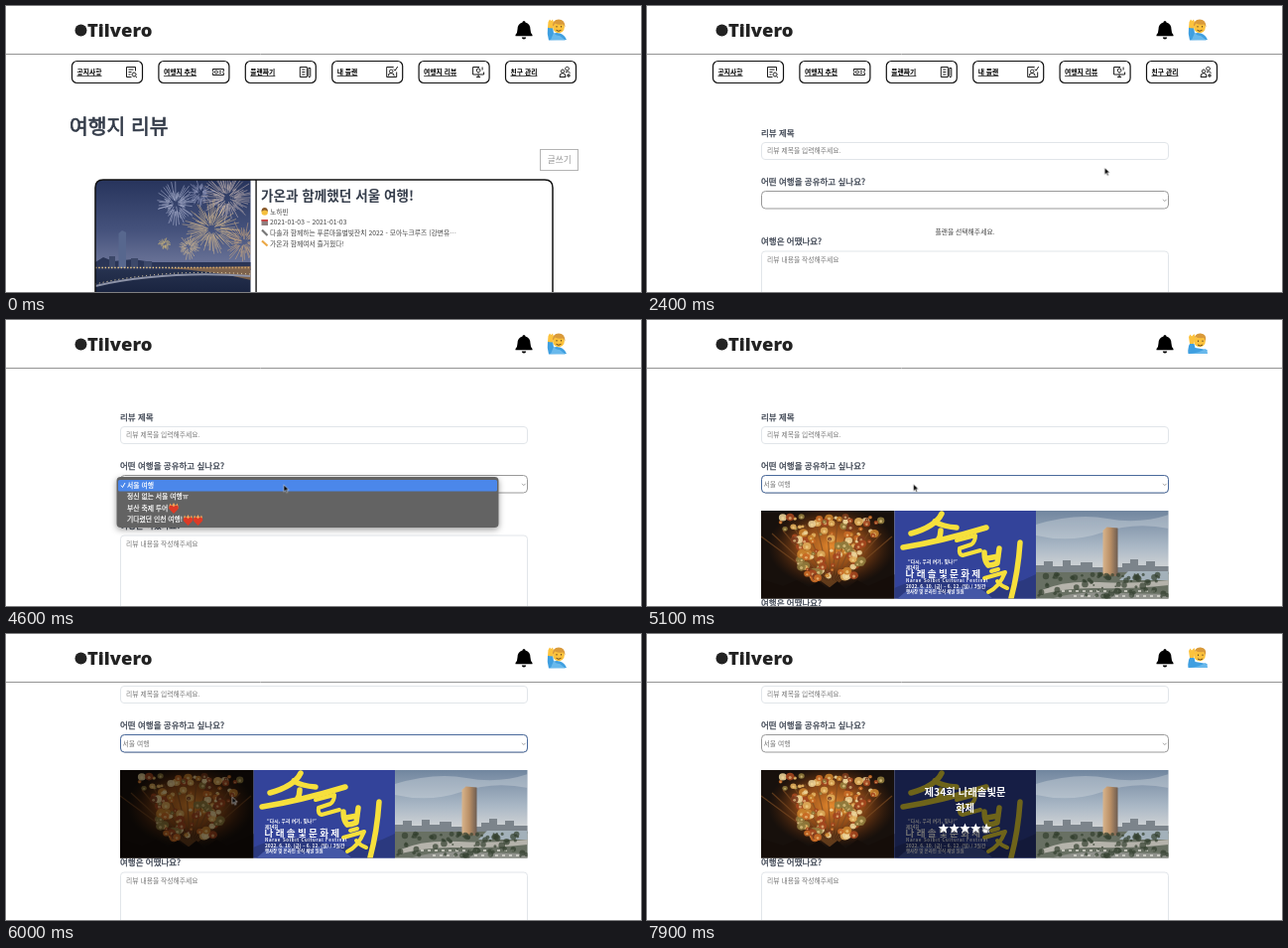
Animation, 640 px wide and 288 px high, one loop 8 s. Source, as an HTML page:

```html
<!DOCTYPE html>
<html lang="ko">
<head>
<meta charset="utf-8">
<title>여행지 리뷰</title>
<style>
html, body { margin: 0; width: 100%; height: 100%; overflow: hidden; background: #fff; }
svg { display: block; }
text { font-family: "Noto Sans CJK KR", "Noto Sans CJK", sans-serif; fill: #343c4a; white-space: pre; }
.brand { font: 800 18.4px "Open Sans", sans-serif; fill: #222; }
.nav text { font-size: 6.8px; font-weight: 700; text-decoration: underline; fill: #000; }
.nav g { fill: none; stroke: #000; stroke-width: .9; }
/* A hairline stroke stands in for a medium weight. */
.h1 { font-size: 20.4px; stroke: #343c4a; stroke-width: .7; }
.label { font-size: 8.5px; stroke: #343c4a; stroke-width: .25; }
.small { font-size: 6.8px; fill: #444; }
.hold { font-size: 6.8px; fill: #777; }
.btn { font-size: 8.7px; fill: #999; }
.field { fill: #fff; stroke: #e1e5e9; }
.menu text { font-size: 6.8px; fill: #fff; stroke: #fff; stroke-width: .2; }
.info text { font-size: 10.4px; font-weight: 700; fill: #fff; text-anchor: middle; }
.poster text { fill: #fff; font-size: 4.8px; font-weight: 700; }
.brush { fill: none; stroke: #f6e03c; stroke-linecap: round; stroke-linejoin: round; }

/* One loop is 8 s, so 1.25% is 100 ms. */
.step, .move { animation: 8s infinite; }
.step { animation-timing-function: step-end; }
.move { animation-timing-function: linear; }

.scroll { animation-name: scroll; }
@keyframes scroll {
  0%, 35% { transform: translateY(30px); }
  37.5% { transform: translateY(11px); }
  40%, 68.75% { transform: none; }
  70% { transform: translateY(-17px); }
  72.5% { transform: translateY(-46px); }
  73.75%, 100% { transform: translateY(-55px); }
}
.list { animation-name: list; }
@keyframes list { 0% { visibility: visible; } 20%, 100% { visibility: hidden; } }
.form { animation-name: form; }
@keyframes form { 0% { opacity: 0; } 20%, 100% { opacity: 1; } }
.over { animation-name: over; }
@keyframes over { 0% { opacity: 0; } 11.25%, 100% { opacity: 1; } }
.menu { animation-name: menu; }
@keyframes menu { 0% { opacity: 0; } 48.75% { opacity: 1; } 60%, 100% { opacity: 0; } }
.before { animation-name: before; }
@keyframes before { 0% { opacity: 1; } 60%, 100% { opacity: 0; } }
.after { animation-name: after; }
@keyframes after { 0% { opacity: 0; } 60%, 100% { opacity: 1; } }
.below { animation-name: below; }
@keyframes below { 0% { transform: none; } 60%, 100% { transform: translateY(78px); } }
.focus { animation-name: focus; }
@keyframes focus { 0% { opacity: 0; } 60% { opacity: 1; } 90%, 100% { opacity: 0; } }
.dim1 { animation-name: dim1; }
@keyframes dim1 { 0%, 72.5% { opacity: 0; } 75%, 91.25% { opacity: .52; } 93.75%, 100% { opacity: 0; } }
.info1 { animation-name: info1; }
@keyframes info1 { 0%, 75% { opacity: 0; } 78.75%, 91.25% { opacity: 1; } 93.75%, 100% { opacity: 0; } }
.dim2 { animation-name: dim2; }
@keyframes dim2 { 0%, 92.5% { opacity: 0; } 96.25%, 100% { opacity: .55; } }
.info2 { animation-name: info2; }
@keyframes info2 { 0%, 92.5% { opacity: 0; } 96.25%, 100% { opacity: 1; } }
.cursor { animation-name: cursor; }
@keyframes cursor {
  0%, 2.5% { transform: translate(587px, 300px); }
  7.5% { transform: translate(574px, 196px); }
  11.25%, 23.75% { transform: translate(564px, 154px); }
  33.75% { transform: translate(400px, 168px); }
  42.5% { transform: translate(356px, 157px); }
  48.75% { transform: translate(332px, 162px); }
  56.25%, 60% { transform: translate(280px, 166px); }
  70% { transform: translate(249.5px, 164px); }
  75% { transform: translate(228px, 164px); }
  83.75% { transform: translate(226px, 186px); }
  91.25% { transform: translate(246px, 204px); }
  95% { transform: translate(312px, 206px); }
  98.75%, 100% { transform: translate(338px, 193px); }
}
.arrow { animation-name: arrow; }
@keyframes arrow { 0% { opacity: 1; } 11.25% { opacity: 0; } 20% { opacity: 1; } 77.5%, 100% { opacity: 0; } }
.hand { animation-name: hand; }
@keyframes hand { 0% { opacity: 0; } 11.25% { opacity: 1; } 20% { opacity: 0; } 77.5%, 100% { opacity: 1; } }
.rest { animation-name: rest; }
@keyframes rest {
  0%, 11.25%, 30%, 48.75%, 67.5%, 86.25% { opacity: 1; }
  2.5%, 21.25%, 40%, 58.75%, 77.5%, 96.25%, 100% { opacity: 0; }
}
.wave { animation-name: wave; }
@keyframes wave {
  0%, 11.25%, 30%, 48.75%, 67.5%, 86.25% { opacity: 0; }
  2.5%, 21.25%, 40%, 58.75%, 77.5%, 96.25%, 100% { opacity: 1; }
}
</style>
</head>
<body>
<svg width="640" height="288">
  <defs>
    <linearGradient id="night" x2="0" y2="1">
      <stop stop-color="#27345c"/><stop offset=".45" stop-color="#45527c"/>
      <stop offset=".76" stop-color="#6b7498"/><stop offset=".8" stop-color="#26324f"/><stop offset="1" stop-color="#1a2440"/>
    </linearGradient>
    <linearGradient id="sky" x2="0" y2="1">
      <stop stop-color="#71869f"/><stop offset=".4" stop-color="#a9b7c5"/><stop offset=".65" stop-color="#d0d3d5"/>
    </linearGradient>
    <linearGradient id="gold"><stop stop-color="#d8b48c"/><stop offset=".5" stop-color="#b98f66"/><stop offset="1" stop-color="#6d5c50"/></linearGradient>
    <radialGradient id="glow"><stop stop-color="#e58a2e"/><stop offset=".5" stop-color="#a8561a" stop-opacity=".8"/><stop offset="1" stop-color="#5a2a0c" stop-opacity="0"/></radialGradient>
    <filter id="shade" x="-5%" y="-20%" width="110%" height="150%"><feDropShadow dx="0" dy="2" stdDeviation="3" flood-opacity=".4"/></filter>
    <clipPath id="cover"><path d="M90 288V183q0-8 8-8H246.500V288z"/></clipPath>
    <clipPath id="shot1"><path d="M115 192h134.500v88.500H115z"/></clipPath>
    <clipPath id="shot2"><path d="M249.500 192H392v88.500H249.500z"/></clipPath>
    <clipPath id="shot3"><path d="M392 192h133.500v88.500H392z"/></clipPath>
    <g id="burning">
      <path d="M-4.500 0Q-5-3-3.500-5.500Q-2.500-4-2-3Q-1-4 0-6Q1-4 2-3Q2.500-4 3.500-5.500Q5-3 4.500 0z" fill="#f3a55a"/>
      <path d="M0 5L-4 1C-6.500-2-2.500-5 0-1.800C2.500-5 6.500-2 4 1z" fill="#dc3a26"/>
    </g>
  </defs>

  <g class="move scroll">
    <g transform="translate(0 -30)">
      <g class="nav" id="nav"></g>
      <g class="step list">
        <text class="h1" x="64" y="128.500">여행지 리뷰</text>
        <rect x="538.500" y="144.500" width="38" height="21" fill="#fff" stroke="#b4b4b4"/>
        <text class="btn" x="545.700" y="158">글쓰기</text>
        <g class="step over">
          <rect x="538.500" y="144.500" width="38" height="21" fill="#6c757d" stroke="#6c757d"/>
          <text class="btn" x="545.700" y="158" style="fill:#fff">글쓰기</text>
        </g>
        <g clip-path="url(#cover)">
          <rect x="90" y="175" width="157" height="113" fill="url(#night)"/>
          <path d="M90 258l8-5 10 4 20-2 20 3h99v8H90z" fill="#2a3556"/>
          <path d="M113.500 264V229l3.500-3 4 2v36z" fill="#57678e"/>
          <path d="M104 264v-12h6v12zM126 264v-10h7v10zM139 264v-7h8v7z" fill="#3c4869"/>
          <g id="fire" fill="none" stroke-width=".6"></g>
          <path d="M90 263.500H247" stroke="#e9c88a" stroke-width="1.600" stroke-dasharray="1.500 1.700"/>
          <path d="M160 264q45 2 87 12v-14z" fill="#c58a4a" opacity=".55"/>
          <path d="M90 282q70-16 157-10" fill="none" stroke="#8d93a8" stroke-width="2"/>
          <path d="M90 280q70-16 157-10" fill="none" stroke="#f3deb0" stroke-dasharray="1 3"/>
        </g>
        <path d="M90 288V183q0-8 8-8H543q8 0 8 8V290M252 175V290" fill="none" stroke="#111" stroke-width="1.500"/>
        <path d="M247 176h4.200v112H247z" fill="#fff"/>
        <text x="257" y="195.600" font-size="13.600" font-weight="700">가온과 함께했던 서울 여행!</text>
        <circle cx="260.700" cy="207.500" r="3.200" fill="#f5c03f"/><path d="M257.500 207q0-4 3.200-4t3.200 4q-3-3-6.400 0z" fill="#8a5a2b"/>
        <text class="small" x="266" y="209.700">노하빈</text>
        <path d="M257.500 215h6.500v6h-6.500z" fill="#8f8080"/><path d="M257.500 215h6.500v1.800h-6.500z" fill="#c44"/>
        <text class="small" x="266" y="220.400">2021-01-03 ~ 2021-01-03</text>
        <path d="M258 225.500l5.500 5.500" stroke="#777" stroke-width="2.200"/>
        <text class="small" x="266" y="230.900">다솔과 함께하는 푸른마을별빛잔치 2022 - 모아누크루즈 (강변유…</text>
        <path d="M258 236.500l5.500 5" stroke="#eba845" stroke-width="2.200"/>
        <text class="small" x="266" y="241.500">가온과 함께여서 즐거웠다!</text>
      </g>
    </g>

    <g class="step form">
      <text class="label" x="115" y="101.200">리뷰 제목</text>
      <rect class="field" x="115.500" y="107.500" width="410" height="17" rx="3.500"/>
      <text class="hold" x="121" y="118.400">리뷰 제목을 입력해주세요.</text>
      <text class="label" x="115" y="150.200">어떤 여행을 공유하고 싶나요?</text>
      <rect class="field" x="115.500" y="156.500" width="410" height="17.500" rx="4" style="stroke:#999"/>
      <rect class="field step focus" x="115.500" y="156.500" width="410" height="17.500" rx="4" style="stroke:#4a6a9c"/>
      <path d="M520 164.800l1.800 1.800 1.800-1.800" fill="none" stroke="#888" stroke-width=".8"/>
      <text class="hold step after" x="117.500" y="167.800">서울 여행</text>
      <text class="small step before" x="320.500" y="199.500" text-anchor="middle">플랜을 선택해주세요.</text>

      <g class="step below">
        <text class="label" x="115" y="210.400">여행은 어땠나요?</text>
        <rect class="field" x="115.500" y="217" width="410" height="150" rx="3.500"/>
        <text class="hold" x="121" y="227.600">리뷰 내용을 작성해주세요</text>
      </g>

      <g class="step after">
        <g clip-path="url(#shot1)">
          <rect x="115" y="192" width="135" height="89" fill="#17100c"/>
          <ellipse cx="186" cy="228" rx="64" ry="42" fill="url(#glow)"/>
          <path id="beams" stroke="#7a4a22" stroke-width="1.200" opacity=".7"/>
          <g id="lamps"></g>
          <path d="M115 281v-20l22 7 14-6 12 7 10-6 9 8 10-8 8 8 12-9 11 6 27-12v25z" fill="#150d09"/>
        </g>
        <g class="poster" clip-path="url(#shot2)">
          <rect x="249" y="192" width="143" height="89" fill="#33439a"/>
          <path d="M249 270q35-16 70-5t73-9v25H249z" fill="#2b397f"/>
          <path d="M252 281q22-22 47-5q30-17 50 5z" fill="#4457a6"/>
          <path class="brush" stroke-width="5.500" d="M297 195q-6 13-31 20M290 203q8 5 22 6M258 229q38-6 84-20M296 212q0 6-3 10M376 224q-2 30-9 56M340 234q0 9 4 13M355 230l-2 15q-5 2-9 2M343 240l11-2"/>
          <path class="brush" stroke-width="4" d="M312 222l19-5q0 6-4 9l-12 4q-1 6 3 7l18-5M347 253l7-2M340 260l21-6q-6 15-17 20M353 263q4 5 10 7"/>
          <text x="263" y="245">“다시, 우리 여기, 빛나!”</text>
          <text x="261" y="250.700" style="font-size:4.400px">제34회</text>
          <text x="260.500" y="259" style="font-size:9.600px;letter-spacing:2.300px">나래솔빛문화제</text>
          <text x="261" y="263.500" style="font-size:4.400px;letter-spacing:.65px">Narae Solbit Cultural Festival</text>
          <text x="261" y="269.500">2022. 6. 10. (금) – 6. 12. (일) / 3일간</text>
          <text x="261" y="275" style="font-size:4.400px">행사장 및 온라인 공식 채널 일원</text>
        </g>
        <g clip-path="url(#shot3)">
          <rect x="392" y="192" width="134" height="89" fill="url(#sky)"/>
          <path d="M392 206q40-12 72-6t62-4v14q-35-7-67 4t-67 3z" fill="#dce1e5" opacity=".35"/>
          <path d="M392 256v-9h8v-4h9v5h10v-6h8v5h10v-3h12v5h30v-4h8v-4h8v6h8v-4h9v5h14v8z" fill="#7c848b"/>
          <path d="M392 254h134v27H392z" fill="#687063"/>
          <path d="M485 253h41v9h-50z" fill="#a3b1ba"/>
          <path d="M459.500 258v-46l4-3.500 11 1v48.500z" fill="url(#gold)"/>
          <path d="M398 272q22-10 58-8t70-2v5q-40 4-70 3t-58 6z" fill="#b5b3ab"/>
          <path d="M406 281q28-9 68-6l52 1v5z" fill="#8f918b"/>
          <path d="M418 273h96M430 278h90" stroke="#dcdad4" stroke-width="1.500" stroke-dasharray="3 4"/>
          <g id="trees" fill="#34402f"></g>
        </g>
        <rect class="move dim1" x="115" y="192" width="134.500" height="88.500"/>
        <g class="info move info1"><text x="182" y="226">등불 축제</text><path class="stars" transform="translate(182 251)" fill="#fff"/></g>
        <rect class="move dim2" x="249.500" y="192" width="142.500" height="88.500"/>
        <g class="info move info2">
          <text x="320.500" y="218.300">제34회 나래솔빛문</text><text x="320.500" y="234">화제</text>
          <path class="stars" transform="translate(320.500 251)" fill="#fff"/>
        </g>
      </g>

      <g class="step menu">
        <rect x="111.500" y="158" width="385" height="51" rx="4" fill="#646464" filter="url(#shade)"/>
        <rect x="113" y="161" width="382" height="11.500" rx="1.500" fill="#4b87ea"/>
        <path d="M116 166.500l1.500 2 2.500-4.500" fill="none" stroke="#fff"/>
        <text x="122" y="168.500">서울 여행</text>
        <text x="122" y="180">정신 없는 서울 여행ㅠ</text>
        <text x="122" y="191.500">부산 축제 투어</text>
        <text x="122" y="203">기다렸던 인천 여행!</text>
        <use href="#burning" x="169" y="190"/><use href="#burning" x="183.500" y="202"/><use href="#burning" x="193.500" y="202"/>
      </g>
    </g>
  </g>

  <rect width="640" height="48.500" fill="#fff"/>
  <path d="M0 48.500H640" stroke="#949494"/>
  <circle cx="75.500" cy="24.500" r="6" fill="#222"/>
  <text class="brand" x="82" y="31">Tilvero</text>
  <path d="M522 15q1.500 0 1.500 1.500q5 1.500 5 7q0 3.500 2 5.500v1.200h-17V29q2-2 2-5.500q0-5.500 5-7Q520.500 15 522 15zM519.800 31.500h4.400q-.2 2-2.200 2t-2.200-2z"/>
  <g class="step rest">
    <path d="M547 34.500q-2-6-1-13l5-1 1 7q9-2 13 6.500z" fill="#3f9fe0"/>
    <path d="M546 22l.5-6 1.500-2.500 1.500 1.500 1.500-1.500 1 3-1 6z" fill="#fcc23c"/>
    <circle cx="557" cy="21.500" r="5.800" fill="#fcc23c"/>
    <path d="M551 21q-.5-7.500 6-7.500t6.500 8l-2-3q-5 1-8-1z" fill="#d99a3a"/>
    <path d="M555 20v1.500M559.500 20v1.500M554.500 24.300q2.500 2 5 0" fill="none" stroke="#5a3a1c" stroke-width=".9"/>
    <path d="M549 34l3-7q2 3 6 3l6 4.500z" fill="#69b9ec"/>
  </g>
  <g class="step wave">
    <path d="M545.500 34q-1-7 2-11l4 1 1 4 12 2v4z" fill="#3f9fe0"/>
    <circle cx="557" cy="21.500" r="5.800" fill="#fcc23c"/>
    <path d="M551 21q.5-8 7-7.500t5 8l-2-3.500q-5 1-8-1z" fill="#d99a3a"/>
    <path d="M555.500 20.500v1.500M560 20.500v1.500M555 25q2.500 2 5 0" fill="none" stroke="#5a3a1c" stroke-width=".9"/>
    <path d="M547 24l-1-7 1.500-2.500 1.500 2 2.500-2.500 1 3-1.500 7z" fill="#fcc23c"/>
    <path d="M547 34q10-1 16-5l2 5z" fill="#69b9ec"/>
  </g>

  <g class="move cursor">
    <g transform="scale(.85)">
      <path class="step arrow" d="M0 0v8.200l2-1.800 1.300 3 1.300-.6-1.300-2.900H6z" stroke="#fff" stroke-width=".6"/>
      <path class="step hand" d="M1 0q1 0 1 1v2.500l4 1q1 .3 .9 1.500L6.500 9H2.500L-.5 5.800q0-1 1-.8L0 1q0-1 1-1z" fill="#fff" stroke="#222" stroke-width=".7"/>
    </g>
  </g>
</svg>
<script>
const $ = id => document.getElementById(id);
function add(parent, tag, attrs, text) {
  const el = document.createElementNS("http://www.w3.org/2000/svg", tag);
  for (const key in attrs) el.setAttribute(key, attrs[key]);
  if (text) el.textContent = text;
  return parent.appendChild(el);
}
let seed = 7;
const rnd = () => (seed = seed * 16807 % 2147483647) / 2147483647;
const pick = list => list[Math.floor(rnd() * list.length)];
const polar = (x, y, r, a) => `${(x + r * Math.cos(a)).toFixed(1)} ${(y + r * Math.sin(a)).toFixed(1)}`;

const tabs = [
  ["공지사항", "M10 5V1H1v10h5M3 3.500h5M3 6h3M3 8.500h2M8.500 6.500a2 2 0 1 0 .1 0M10 10.500l1.500 1"],
  ["여행지 추천", "M.5 3h11v2q-1.500 1 0 2v2H.5V7q1.500-1 0-2zM4 4.500a1.500 1.500 0 1 0 .1 0M7 5h2M7 7h2"],
  ["플랜짜기", "M1 1h7v10H1zM3 3.500h3M3 6h3M3 8.500h3M9.500 2v8l1 1.500 1-1.500V2z"],
  ["내 플랜", "M8 1H1v10h10V6M5.500 3.500a1.700 1.700 0 1 0 .1 0M2.500 10q0-3 3-3t3 3M8 3l1.500 1.500L12 .5"],
  ["여행지 리뷰", "M7 1H.5v7.500h11V6M4 11h4M6 8.500V11M6 7Q3 4.500 4.500 3T7.500 3 6 7M10 1v3"],
  ["친구 관리", "M8 .8a1.800 1.800 0 1 0 .1 0M3.500 3.500a1.700 1.700 0 1 0 .1 0M.5 11q0-4 3-4t3 4zM6.500 6q3-1.500 4.500 1M9.500 7.500v4M7.500 9.500h4"]
];
tabs.forEach(([name, icon], i) => {
  const x = 66.5 + i * 87.4;
  add($("nav"), "rect", { x, y: 55.5, width: 71, height: 22, rx: 5, fill: "#fff", stroke: "#111", "stroke-width": 1.2 });
  add($("nav"), "text", { x: x + 5, y: 69 }, name);
  add(add($("nav"), "g", { transform: `translate(${x + 54} 60.5)` }), "path", { d: icon });
});

// Fireworks: x, y, radius, rays, colour
[[223, 193, 27, 80, "#e8d3c6"], [171, 199, 23, 64, "#cfd3ea"], [207, 224, 30, 90, "#e7c48f"],
 [196, 188, 15, 40, "#b9bfe0"], [240, 238, 24, 60, "#e4b67c"], [160, 240, 7, 24, "#ffd873"], [184, 243, 13, 40, "#f0cd91"]]
  .forEach(([x, y, r, n, stroke]) => {
    let d = "";
    for (let i = 0; i < n; i++) {
      const a = i / n * 2 * Math.PI + rnd() * .1, end = r * (.4 + .6 * rnd());
      d += `M${polar(x, y, r * (.1 + .3 * rnd()), a)}L${polar(x, y, end, a)}`;
    }
    add($("fire"), "path", { d, stroke, opacity: .75 });
  });

let beams = "";
for (let i = 0; i < 13; i++) beams += `M186 270L${115 + i * 11} ${200 + Math.abs(i - 6) * 3}`;
$("beams").setAttribute("d", beams);

// Lanterns fill a fan that narrows downwards.
for (let i = 0; i < 150; i++) {
  const fall = rnd(), r = 1.5 + rnd() * 3.2;
  const cx = 184 + (rnd() * 2 - 1) * (56 - 32 * fall), cy = 198 + 62 * fall;
  add($("lamps"), "ellipse", { cx, cy, rx: r, ry: r * .9, opacity: .9,
    fill: pick(["#c8802c", "#e0ad5a", "#a5461f", "#c96a24", "#e8cf95", "#8f7a3c", "#7a3a1c"]) });
  add($("lamps"), "circle", { cx, cy: cy + r * .2, r: r * .35, fill: "#ffe3a0", opacity: .55 });
}
for (let i = 0; i < 80; i++)
  add($("trees"), "circle", { cx: 392 + rnd() * 134, cy: 256 + 24 * rnd() ** 1.6, r: 1 + rnd() * 2.4, opacity: .7 });

let stars = "";
for (let s = -2; s <= 2; s++) {
  for (let i = 0; i < 10; i++)
    stars += (i ? "L" : "M") + polar(s * 10.8, 0, i % 2 ? 2.3 : 5.6, (i - 2.5) * Math.PI / 5);
  stars += "z";
}
document.querySelectorAll(".stars").forEach(el => el.setAttribute("d", stars));
</script>
</body>
</html>
```
